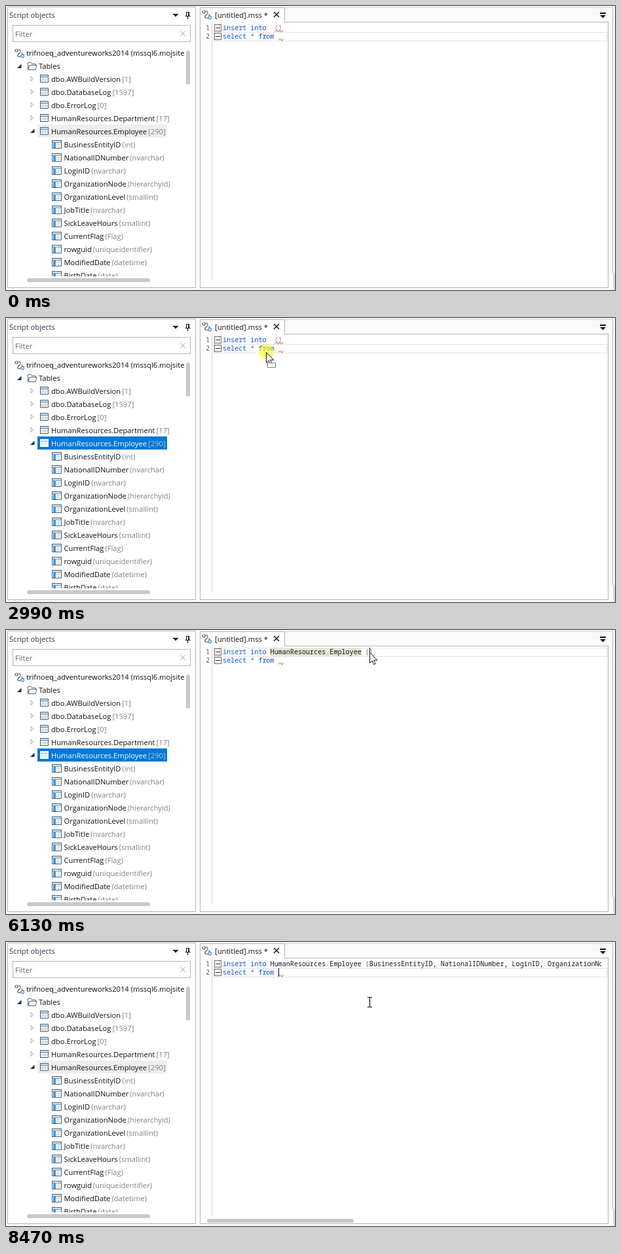
Recreate the animation shown at these times as an HTML page with a canvas. Size 930x434 px, loop 8700 ms.

```html
<!DOCTYPE html>
<html lang="en">
<head>
<meta charset="utf-8">
<title>Dragging tables and columns into a script</title>
<style>
  html, body { margin: 0; width: 100%; height: 100%; overflow: hidden; background: #fff; }
  canvas { display: block; width: 930px; height: 434px; }
</style>
</head>
<body>
<canvas id="stage" width="930" height="434"></canvas>
<script>
const ctx = document.getElementById('stage').getContext('2d');
const LOOP = 8700;
const UI = '11.2px "Open Sans", "Noto Sans", sans-serif';
const MONO = '10.083px "Noto Sans Mono", "DejaVu Sans Mono", monospace';
const INK = '#101010', GREY = '#808080', EDGE = '#b4b4b4', KEYWORD = '#0b4fd8', CODE = '#16162a';
const TABLE_DROP = 3760, RELEASE = 6130, COLUMN_DROP = 6210, CARET_MOVED = 7070;

// Pointer moves: start, end, number of steps, destination.
const ENTRY = [945, 456];
const MOVES = [
  [230, 1100, 12, 312, 170],
  [1160, 1770, 9, 190, 190],
  [2380, 2460, 2, 169, 192],
  [2610, 2990, 6, 397, 52],
  [3070, 3380, 5, 406, 34],
  [3760, 4320, 8, 195, 188],
  [4470, 4550, 2, 190, 212],
  [4630, 4790, 3, 307, 158],
  [4870, 5340, 7, 566, 31],
  [5490, 5810, 5, 555, 34],
  [6610, 6690, 2, 555, 39],
  [6770, 7070, 5, 555, 92]
];

const TABLES = [
  ['dbo.AWBuildVersion', '[1]'], ['dbo.DatabaseLog', '[1597]'], ['dbo.ErrorLog', '[0]'],
  ['HumanResources.Department', '[17]'], ['HumanResources.Employee', '[290]']
];
const COLUMNS = [
  ['BusinessEntityID', '(int)'], ['NationalIDNumber', '(nvarchar)'], ['LoginID', '(nvarchar)'],
  ['OrganizationNode', '(hierarchyid)'], ['OrganizationLevel', '(smallint)'], ['JobTitle', '(nvarchar)'],
  ['SickLeaveHours', '(smallint)'], ['CurrentFlag', '(Flag)'], ['rowguid', '(uniqueidentifier)'],
  ['ModifiedDate', '(datetime)'], ['BirthDate', '(date)']
];

const between = (t, a, b) => t >= a && t < b;
const columnX = col => 331 + col * 6.05;

function rect(x, y, w, h, color) {
  ctx.fillStyle = color;
  ctx.fillRect(x, y, w, h);
}
function frame(x, y, w, h, stroke, fill) {
  if (fill) rect(x, y, w, h, fill);
  ctx.strokeStyle = stroke;
  ctx.lineWidth = 1;
  ctx.strokeRect(x + .5, y + .5, w - 1, h - 1);
}
function path(x, y, d, { fill, stroke, width = 1 }) {
  ctx.save();
  ctx.translate(x, y);
  const shape = new Path2D(d);
  if (fill) { ctx.fillStyle = fill; ctx.fill(shape); }
  if (stroke) { ctx.strokeStyle = stroke; ctx.lineWidth = width; ctx.stroke(shape); }
  ctx.restore();
}
function text(str, x, y, color = INK, font = UI) {
  ctx.font = font;
  ctx.fillStyle = color;
  ctx.fillText(str, x, y);
  return x + ctx.measureText(str).width;
}
function bar(x, y, w, h, color = '#c9c9c9') {
  ctx.fillStyle = color;
  ctx.beginPath();
  ctx.roundRect(x, y, w, h, 3);
  ctx.fill();
}
function clipped(x, y, w, h, draw) {
  ctx.save();
  ctx.beginPath();
  ctx.rect(x, y, w, h);
  ctx.clip();
  draw();
  ctx.restore();
}

function scriptIcon(x, y) {
  path(x, y, 'M4.8 2.5C10 1 10 5 7.5 7S3 12 7 12.5L10 12.2', { stroke: '#555f6b', width: 1.2 });
  path(x, y, 'M5 3a2 2 0 1 1-4 0a2 2 0 1 1 4 0', { fill: '#fff', stroke: '#555f6b', width: 1.2 });
  path(x, y, 'M14.5 11.5a2.3 2.3 0 1 1-4.6 0a2.3 2.3 0 1 1 4.6 0M10.5 6.5l2 2.5', { stroke: '#3f86c6', width: 1.3 });
}
function tableIcon(x, y, lit) {
  const line = lit ? '#fff' : '#4b6275';
  frame(x, y, 13, 12, line, '#fff');
  rect(x + 1, y + 1, 11, 2, lit ? '#e4f1fc' : '#cfe3f3');
  rect(x + 1, y + 3, 11, 1, lit ? '#8fbfe8' : '#5d7f9b');
  const grid = lit ? '#d3e7f8' : '#c3d0da';
  for (const dy of [6, 8]) rect(x + 1, y + dy, 11, 1, grid);
  for (const dx of [4, 8]) rect(x + dx, y + 4, 1, 7, grid);
}
function columnIcon(x, y) {
  frame(x, y, 15, 13, '#4b6275', '#fff');
  rect(x + 1, y + 1, 13, 2, '#d5e1ea');
  rect(x + 1, y + 3, 13, 1, '#8499a9');
  rect(x + 2, y + 4, 4, 8, '#3b9ae6');
  for (const dy of [6, 9]) rect(x + 7, y + dy, 7, 1, '#ccd6de');
  rect(x + 10, y + 4, 1, 8, '#ccd6de');
}
function expander(x, y, open) {
  if (open) path(x, y, 'M3.5-3.5V3H-3Z', { fill: '#333' });
  else path(x, y, 'M-2-3.5L2 0L-2 3.5Z', { stroke: '#aaa' });
}
function cross(x, y, r, color, width) {
  path(x, y, `M${-r} ${-r}L${r} ${r}M${r} ${-r}L${-r} ${r}`, { stroke: color, width });
}
function squiggle(x, y, w) {
  let d = 'M0 2.5';
  for (let i = 2.5, up = true; i <= w; i += 2.5, up = !up) d += `L${i} ${up ? 0 : 3}`;
  path(x, y, d, { stroke: '#d0492a' });
}

function drawTree(selected) {
  frame(2, 1, 288, 430, EDGE, '#fff');
  text('Script objects', 5, 18, '#333347');
  path(259, 12, 'M-4.5 0H4.5L0 4.5Z', { fill: '#111' });
  path(277, 9, 'M-1.5 .5H2.5V6.5M-1.5 .5V6.5M1.8 .5V6.5M-3.5 6.5H4.5M.5 7V11', { stroke: '#111', width: 1.1 });
  frame(10, 29, 272, 26, EDGE);
  text('Filter', 14, 47, '#6c6c6c');
  cross(270, 42, 3.8, '#aaa', 1);

  clipped(3, 60, 270, 353, () => {
    scriptIcon(13, 65);
    text('trifnoeq_adventureworks2014 (mssql6.mojsite', 31, 76);
    expander(20, 92, true);
    path(32, 85, 'M1.5 12.5V1.5H6L7.5 3.5H13.5V5.5M1.5 12.5L4 5.5H15L13 12.5Z', { fill: '#fff', stroke: '#4b6275' });
    text('Tables', 50, 96);
    TABLES.forEach(([name, count], i) => {
      const y = 112 + i * 20, last = i === TABLES.length - 1, lit = last && selected;
      if (last) rect(48, y - 11, 198, 20, lit ? '#0078d7' : '#eeeeee');
      expander(40, y - 1, last);
      tableIcon(52, y - 7, lit);
      const end = text(name, 69, y + 4, lit ? '#fff' : INK);
      text(count, end + 2, y + 4, lit ? '#a9c4da' : GREY);
    });
    COLUMNS.forEach(([name, type], i) => {
      const y = 212 + i * 20;
      columnIcon(70, y - 7);
      const end = text(name, 88.5, y + 4);
      text(type, end + 2, y + 4, GREY);
    });
  });
  bar(275, 68, 6, 52);
  bar(32, 416, 188, 6);
}

function drawEditorShell() {
  frame(296, 24, 624, 407, EDGE, '#fff');
  rect(426, 2, 501, 1, '#d0d0d0');
  rect(926, 2, 1, 406, EDGE);
  rect(928, 408, 1, 26, EDGE);
  frame(296, 2, 130, 23, EDGE, '#fff');
  rect(297, 24, 128, 2, '#fff');
  scriptIcon(299, 6);
  text('[untitled].mss *', 319, 18);
  cross(413, 13, 4, '#111', 1.5);
  rect(907, 10, 9, 2, '#111');
  path(911.5, 14, 'M-4.5 0H4.5L0 4.5Z', { fill: '#111' });
  for (let y = 27; y < 418; y += 2) rect(314, y, 1, 1, '#a5a5a5');
  for (const line of [1, 2]) {
    const y = 15 + line * 13;
    text(line, 305, y + 9, '#666', MONO);
    frame(318, y, 11, 11, '#666');
    rect(320, y + 5, 7, 1, '#333');
  }
}

function drawCode(t, line, caret) {
  const tableIn = t >= TABLE_DROP, columnsIn = t >= COLUMN_DROP;
  const code = (str, col, row, color) => text(str, columnX(col), 24 + row * 13, color, MONO);

  frame(317, 14 + line * 13, 601, 14, '#e4e4e4');
  if (tableIn && !columnsIn) rect(403, 27, 140, 13, '#e4e9d3');
  if (between(t, COLUMN_DROP, 7220)) rect(548, 27, 7, 13, '#c5efc5');

  code('insert into', 0, 1, KEYWORD);
  if (tableIn) {
    code('HumanResources', 12, 1, CODE);
    code('.', 26, 1, '#888');
    code('Employee', 27, 1, CODE);
  }
  if (columnsIn) {
    code('(', 36, 1, '#666');
    clipped(317, 25, 592, 18, () =>
      code(COLUMNS.slice(0, 4).map(c => c[0]).join(', '), 37, 1, CODE));
    bar(307, 423, 224, 6);
  } else {
    const col = tableIn ? 36 : 13;
    code('()', col, 1, tableIn ? '#777' : '#999');
    squiggle(columnX(tableIn ? 37 : 13) + 1, 37, tableIn ? 8 : 13);
  }
  code('select', 0, 2, KEYWORD);
  code('*', 7, 2, '#777');
  code('from', 9, 2, KEYWORD);
  squiggle(416, 50, 8);

  if (caret) rect(Math.round(columnX(caret)), 14 + line * 13, 1, 13, '#000');
}

// Label shown under a fresh drop; it holds and then fades.
function drawDropLabel(age, x, name, icon, iconWidth) {
  if (age < 0 || age >= 560) return;
  ctx.save();
  ctx.globalAlpha = Math.min(1, (560 - age) / 160);
  ctx.font = UI;
  frame(x, 52, Math.round(ctx.measureText(name).width) + 34, 39, '#b9b9ae', '#fffff8');
  icon(x + 8 + (15 - iconWidth) / 2, 66);
  text(name, x + 26, 76, '#555');
  ctx.restore();
}

function pointerAt(t) {
  let [x, y] = ENTRY;
  for (const [start, end, steps, toX, toY] of MOVES) {
    if (t < start) break;
    const step = Math.floor((t - start) / (end - start) * (steps - 1) + .15) + 1;
    const p = Math.min(1, step / steps);
    x += (toX - x) * p;
    y += (toY - y) * p;
  }
  return [Math.round(x), Math.round(y)];
}

function drawPointer(t, x, y, dragging) {
  if (t < 230) return;
  if (dragging || between(t, 1610, 1770)) {
    ctx.fillStyle = 'rgba(255,255,0,.55)';
    ctx.beginPath();
    ctx.arc(x + .5, y, 11.5, 0, 7);
    ctx.fill();
  }
  const overText = x > 317 && x < 919 && y > 25 && y < 431;
  if (overText && !dragging && !between(t, RELEASE, COLUMN_DROP)) {
    path(x + .5, y, 'M-3.5-7.5H-1L0-6.5L1-7.5H3.5M0-6.5V6.5M-3.5 7.5H-1L0 6.5L1 7.5H3.5', { stroke: '#111', width: 1.2 });
    return;
  }
  path(x + .5, y + .5, 'M0 0V16L3.7 12.5L6.2 18.2L8.6 17.2L6.2 11.6H11.3Z', { fill: '#fff', stroke: '#111' });
  if (dragging && x > 296) {
    ctx.setLineDash([1, 1]);
    frame(x + 2, y + 16, 13, 8, '#000', '#fff');
    ctx.setLineDash([]);
  }
}

function draw(t) {
  const [x, y] = pointerAt(t);
  const dragging = between(t, 2610, TABLE_DROP) || between(t, 4550, RELEASE);
  const selected = between(t, 1690, TABLE_DROP) || between(t, 4550, COLUMN_DROP);

  let line = between(t, TABLE_DROP, CARET_MOVED) ? 1 : 2;
  if (dragging && x > 317) line = y > 40 ? 2 : 1;

  let caret = 0;
  if (between(t, 3380, TABLE_DROP)) caret = 12;
  if (between(t, 5340, COLUMN_DROP)) caret = 37;
  if (t >= CARET_MOVED && !between(t, 7770, 8470)) caret = 14;

  rect(0, 0, 930, 434, '#fafafa');
  drawTree(selected);
  drawEditorShell();
  drawCode(t, line, caret);
  drawDropLabel(t - TABLE_DROP, 407, 'HumanResources.Employee', tableIcon, 13);
  drawDropLabel(t - COLUMN_DROP, 554, 'BusinessEntityID', columnIcon, 15);
  drawPointer(t, x, y, dragging);
}

function tick() {
  draw(performance.now() % LOOP);
  requestAnimationFrame(tick);
}
tick();
</script>
</body>
</html>
```
